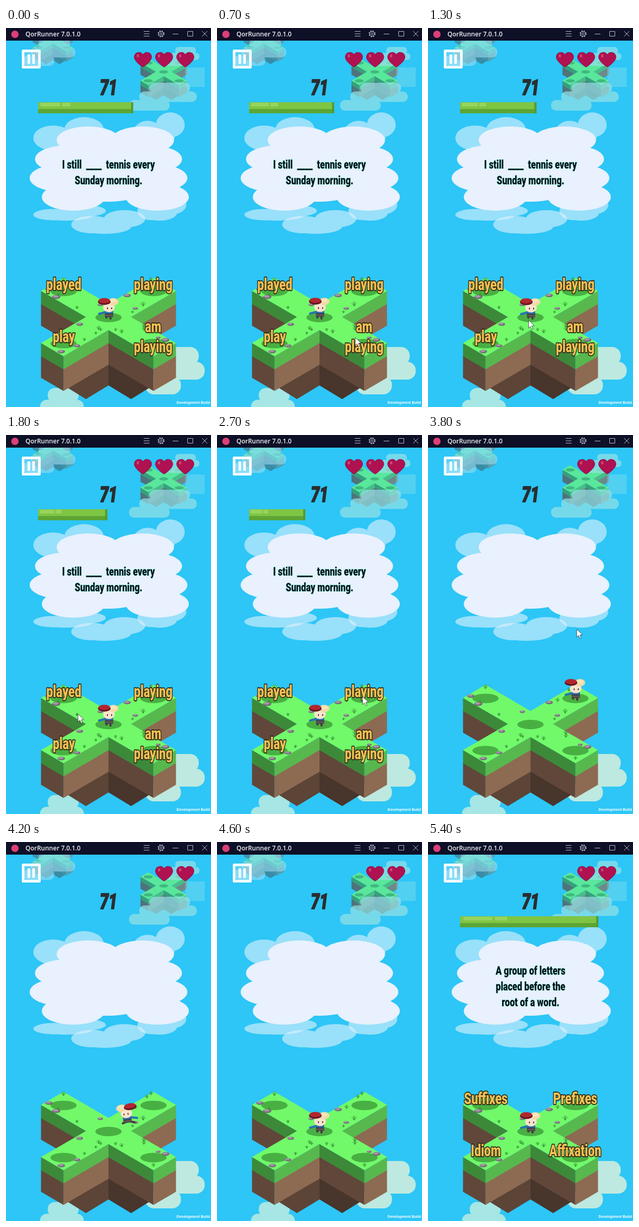
An HTML page with a canvas that plays this animation: 390x720 px, repeating every 5.5 s.

```html
<!DOCTYPE html>
<html lang="en">
<head>
<meta charset="utf-8">
<title>Word island</title>
<style>
html, body { margin: 0; width: 100%; height: 100%; overflow: hidden; background: #2dc6f6; }
canvas { display: block; }
</style>
</head>
<body>
<canvas id="stage" width="390" height="720"></canvas>
<script>
const c = document.getElementById('stage').getContext('2d');
const LOOP = 5500, STEP = 100;
const ANSWERED = 3100, NEXT = 4700;
const SKY = [45, 198, 246];
const SIDES = [-1, 1];

const clamp = v => Math.max(0, Math.min(1, v));
const mix = (a, b, k) => a.map((v, i) => v + (b[i] - v) * k);
function seeded(seed) {
  return () => (seed = seed * 16807 % 2147483647) / 2147483647;
}

function poly(color, points) {
  c.fillStyle = color;
  c.beginPath();
  for (const p of points) c.lineTo(...p);
  c.fill();
}
function rect(color, x, y, w, h) {
  c.fillStyle = color;
  c.fillRect(x, y, w, h);
}
function line(color, width, ...points) {
  c.strokeStyle = color;
  c.lineWidth = width;
  c.beginPath();
  for (const p of points) c.lineTo(...p);
  c.stroke();
}
// Ellipses [x, y, rx, ry], filled as one union
function blobs(color, list) {
  c.fillStyle = color;
  c.beginPath();
  for (const [x, y, rx, ry] of list) {
    c.moveTo(x + rx, y);
    c.ellipse(x, y, rx, ry, 0, 0, 7);
  }
  c.fill();
}
const blob = (color, ...shape) => blobs(color, [shape]);
function at(x, y, sx, sy, draw) {
  c.save();
  c.translate(x, y);
  c.scale(sx, sy);
  draw();
  c.restore();
}

const STYLES = {
  question: { font: '900 22px Roboto, sans-serif', narrow: .76, fill: '#08131a', edge: '#a5f0e6', width: 2, gap: 30 },
  option: { font: '900 31px Roboto, sans-serif', narrow: .72, fill: '#f2c052', edge: '#2a2414', width: 3.5, gap: 38 },
  score: { font: 'italic 900 41px Roboto, sans-serif', narrow: .72, fill: '#2b2d30', edge: '#2b2d30', width: 2, gap: 0 }
};
// Lines are split at "|" and centred around the baseline y.
function label(style, text, x, y) {
  const s = STYLES[style], lines = text.split('|');
  c.font = s.font;
  c.textAlign = 'center';
  c.lineJoin = 'round';
  c.lineWidth = s.width;
  c.strokeStyle = s.edge;
  c.fillStyle = s.fill;
  lines.forEach((text, i) => at(x, y + s.gap * (i - (lines.length - 1) / 2), s.narrow, 1, () => {
    c.strokeText(text, 0, 0);
    c.fillText(text, 0, 0);
  }));
}

// Island grid: u runs down-right, v runs down-left.
const ARM = 5;
const iso = ([u, v], drop = 0) => [(u - v) * 21.4, (u + v) * 12.4 + drop];
const OUTLINE = [], SPOTS = [[0, 0]];
for (let i = 0, turn = ([u, v]) => [-v, u], corners = [[ARM, -1], [ARM, 1], [1, 1]], spot = [ARM - 1, 0]; i < 4; i++) {
  OUTLINE.push(...corners);
  SPOTS.push(spot);
  corners = corners.map(turn);
  spot = turn(spot);
}
// Only walls facing down-right (lit) and down-left (dark) can be seen; far ones come first.
const WALLS = OUTLINE.map((a, i) => [a, OUTLINE[(i + 1) % OUTLINE.length]])
  .filter(([a, b]) => b[1] > a[1] || b[0] < a[0])
  .sort(([a, b], [p, q]) => a[0] + a[1] + b[0] + b[1] - p[0] - p[1] - q[0] - q[1]);

function island(x, y, size, haze) {
  const tone = (...base) => `rgb(${mix(base, SKY, haze).map(Math.round)})`;
  const grass = [tone(60, 138, 57), tone(87, 184, 78)];
  const soil = [tone(96, 71, 58), tone(141, 106, 82)];
  const under = [tone(72, 53, 44), tone(92, 68, 55)];
  at(x, y, size, size, () => {
    for (const side of SIDES)
      poly(under[side < 0 ? 1 : 0], [[side * 85, 130], [side * 43, 156], [0, 130], [0, 80]]);
    for (const [a, b] of WALLS) {
      const lit = b[1] > a[1] ? 1 : 0;
      const wall = (color, from, to) => poly(color, [iso(a, from), iso(b, from), iso(b, to), iso(a, to)]);
      wall(soil[lit], 24, 66);
      wall(grass[lit], 0, 25);
    }
    poly(tone(113, 249, 106), OUTLINE.map(p => iso(p)));
    blobs(tone(72, 176, 66), SPOTS.map(p => [...iso(p, 1), 25, 9]));
  });
}

// Stones and grass scattered along the four arms
function plants() {
  const random = seeded(77);
  for (let i = 0; i < 28; i++) {
    const along = (i % 2 ? 1 : -1) * (1.3 + random() * 3.5), across = (random() < .5 ? -1 : 1) * (.5 + random() * .4);
    const [x, y] = iso(i % 4 < 2 ? [along, across] : [across, along], 549);
    const size = 4 + random() * 4;
    if (i % 3) {
      for (let lean = -.6; lean < .8; lean += .4)
        line('#3a8f35', 1, [195 + x, y], [195 + x + lean * size, y - size * (1.1 - lean * lean)]);
    } else {
      blob('#776a78', 195 + x, y, size, size * .48);
      blob('#a496a5', 194 + x, y - 1, size * .7, size * .28);
    }
  }
}

function hero(t) {
  const out = clamp((t - 3000) / 660), back = clamp((t - 3850) / 640);
  const f = out - back, running = f > 0 && f < 1;
  const bob = running ? 0 : Math.sin(t / 500 * Math.PI) * .5;
  at(195 + 85 * f, 553 - 24 * f - 25 * f * f, back > 0 && back < 1 ? -1 : 1, 1, () => {
    const stride = running ? 5 + 3 * Math.cos(t / 150 * Math.PI) : 0;
    c.lineCap = 'round';
    for (const side of SIDES)
      line('#4a3a38', 4, [side * 3, -6], [side * (4 + stride * .9), -2 + side - stride * .2]);
    c.translate(0, bob);
    if (running) c.rotate(.16);
    rect('#3b4454', -7, -15, 16, 11);
    rect('#7a5a45', -7, -8, 16, 2);
    line('#2a72b0', 4, [-18, -10], [-7, -13], [7, -13]);
    blob('#fbe3cd', 1, -22, 11, 9);
    blob('#f1dba8', 9, -33, 10, 7);
    blob('#f8e7bd', 8, -35, 7, 3);
    blob('#65151f', -8, -33, 12, 6);
    blob('#b22630', -8, -35, 11, 5);
    for (const side of SIDES) rect('#45312d', 1 + side * 4, -22, 2, 3);
  });
}

function heart(x) {
  at(x, 60, 1.07, 1, () => {
    c.beginPath();
    for (const side of SIDES) {
      c.moveTo(0, 14);
      c.bezierCurveTo(side * 9, 7, side * 16, 0, side * 15, -6);
      c.bezierCurveTo(side * 13, -16, side * 2, -15, 0, -8);
    }
    c.lineWidth = 1.5;
    c.strokeStyle = '#8a0d40';
    c.stroke();
    c.fillStyle = '#b01150';
    c.fill();
    blob('#cf4878', -9, -7, 2, 3);
  });
}

// Three staggered rounded rows inside the given box
function cloud(color, x, y, w, h) {
  c.fillStyle = color;
  c.beginPath();
  for (let i = 0; i < 3; i++)
    c.roundRect(x + w * (.3 - .15 * i), y + h * .31 * i, w * (i % 2 ? .85 : .6), h * .38, h * .18);
  c.fill();
}
// Three overlapping ellipses inside the given box
function wisp(x, y, w, h) {
  blobs('rgba(225,242,253,.6)', SIDES.map(s => [x + w * (.5 + s * .22), y + h * (.5 - s * .12), w * .28, h * .36])
    .concat([[x + w * .45, y + h * .7, w * .36, h * .3]]));
}
function bubble() {
  wisp(52, 168, 134, 66);
  wisp(242, 159, 98, 66);
  wisp(52, 336, 138, 30);
  wisp(124, 345, 141, 46);
  wisp(250, 318, 93, 48);
  const lobes = [[195, 268, 110, 62]];
  for (let row = 0; row < 4; row++)
    for (const side of SIDES)
      lobes.push([195 + side * 90 * Math.cos((row - 2) * .48) + (row % 3 ? 0 : 13), 213 + 36 * row, 60, 26]);
  blobs('#e8f1fd', lobes);
}

function scenery() {
  rect(`rgb(${SKY})`, 0, 0, 390, 720);
  island(89, 22, .3, .6);
  cloud('rgba(170,228,245,.5)', 32, 20, 100, 52);
  island(300, 83, .344, .35);
  rect('rgba(150,225,235,.35)', 341, 75, 37, 37);
  cloud('rgba(150,226,230,.7)', 302, 36, 66, 36);
  cloud('rgba(150,226,230,.7)', 234, 104, 129, 53);
  cloud('#bde9e0', 265, 606, 113, 90);
  cloud('#a6e6e4', 50, 684, 98, 72);
}

function hud(t) {
  const white = '#f4fbff';
  rect('rgba(255,255,255,.2)', 32, 43, 32, 32);
  c.lineWidth = 5;
  c.strokeStyle = white;
  c.strokeRect(32.5, 43.5, 31, 31);
  for (const x of [41, 50]) rect(white, x, 50, 5, 18);
  for (let i = t < ANSWERED ? 0 : 1; i < 3; i++) heart(260.5 + 40.3 * i);
  label('score', '71', 195, 127);
}

function timer(w) {
  rect('#7fc544', 61, 141, w, 21);
  rect('#5da534', 61, 154, w, 8);
  rect('#549b31', 57 + w, 141, 4, 21);
  rect('#98d45f', 61 + w * .025, 142, w * .207, 7);
  rect('#98d45f', 61 + w * .252, 142, w * .088, 7);
}

function quiz(question, ...options) {
  label('question', question, 195, 282);
  options.forEach((word, i) => label('option', word, 110 + 170 * (i % 2), 498 + 99 * (i >> 1)));
}

function titleBar() {
  const ink = '#b9bccb';
  rect('#0e1027', 0, 0, 390, 24);
  blob('#dc3f78', 17, 12, 7, 7);
  c.textAlign = 'left';
  c.font = '600 12px "Open Sans", sans-serif';
  c.fillStyle = '#f0f1f6';
  c.fillText('QorRunner 7.0.1.0', 37, 16);
  c.lineCap = 'butt';
  for (let y = 6.5; y < 16; y += 4.5) line(ink, 1, [262, y], [273, y]);
  c.setLineDash([2.2, 2.2]);
  c.lineWidth = 2;
  c.beginPath();
  c.arc(295, 11, 5.5, 0, 7);
  c.stroke();
  c.setLineDash([]);
  c.lineWidth = 1;
  for (const r of [4.5, 2]) {
    c.beginPath();
    c.arc(295, 11, r, 0, 7);
    c.stroke();
  }
  line(ink, 1, [317, 11.5], [328, 11.5]);
  c.strokeRect(345.5, 6.5, 10, 9);
  for (const side of SIDES) line(ink, 1, [378 - 5 * side, 6], [378 + 5 * side, 16]);
}

// Time, x, y of the pointer tip
const PATH = [[200, 325, 14], [700, 263, 588], [1800, 137, 530], [2700, 277, 497], [3700, 277, 497], [4000, 300, 3]];
function pointer(t) {
  const i = PATH.findIndex(p => p[0] > t);
  if (i < 1) return;
  const [t0, ...from] = PATH[i - 1], [t1, ...to] = PATH[i];
  const k = (t - t0) / (t1 - t0);
  at(...mix(from, to, k * k * (3 - 2 * k)), 1, 1, () => {
    const arrow = [[0, 0], [0, 15], [3.5, 12], [6, 17.5], [8.5, 16.5], [6, 11], [11, 10.5]];
    poly('#fff', arrow);
    line('#33383c', .8, ...arrow, arrow[0]);
  });
}

function draw(t) {
  scenery();
  bubble();
  hud(t);
  if (t < ANSWERED) timer(181 - t * .0274);
  if (t >= NEXT) timer(263);
  island(195, 549, 1, 0);
  plants();
  hero(t);
  if (t < ANSWERED) quiz('I still  ____  tennis every|Sunday morning.', 'played', 'playing', 'play', 'am|playing');
  if (t >= NEXT) quiz('A group of letters|placed before the|root of a word.', 'Suffixes', 'Prefixes', 'Idiom', 'Affixation');
  c.font = 'bold 7px "Liberation Sans", Arial, sans-serif';
  c.textAlign = 'right';
  c.fillStyle = '#fff';
  c.fillText('Development Build', 388, 714);
  titleBar();
  pointer(t);
}

const start = performance.now();
function frame() {
  const t = (performance.now() - start) % LOOP;
  draw(Math.floor(t / STEP) * STEP);
  requestAnimationFrame(frame);
}
frame();
</script>
</body>
</html>
```
